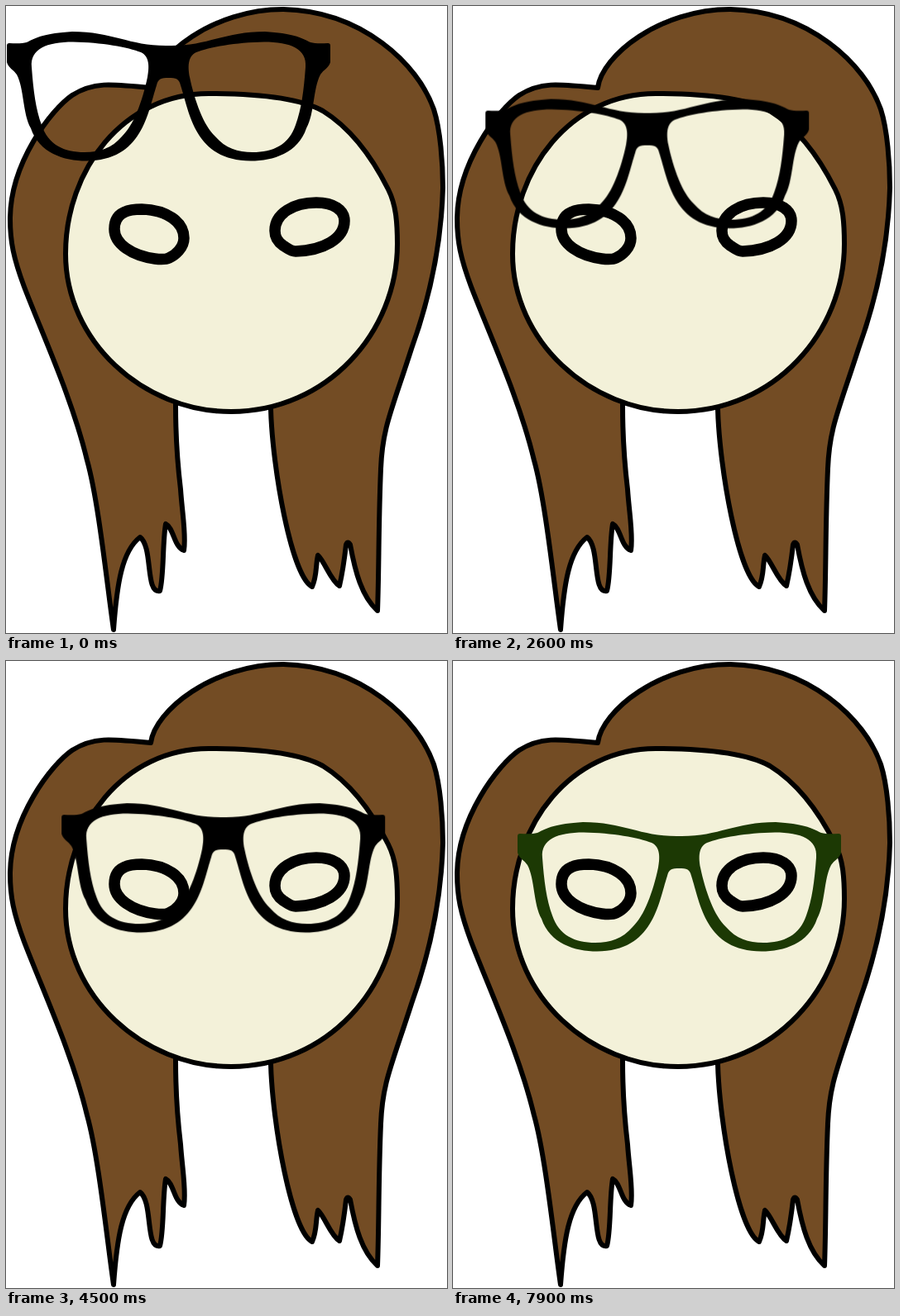
An HTML page without scripts for the animation above (8000 ms loop, 533 px wide and 759 px high).

```html
<!DOCTYPE html>
<html lang="en">
<head>
<meta charset="utf-8">
<title>Trying on glasses</title>
<style>
  html, body { margin: 0; width: 100%; height: 100%; overflow: hidden; background: #fff; }
  svg { display: block; width: 533px; height: 759px; }
  .outline { stroke: #000; stroke-width: 6; stroke-linejoin: round; }
  .hair { fill: #734c24; }
  .face { fill: #f3f1d9; }
  .eyes { fill: none; stroke: #000; stroke-width: 13.5; stroke-linejoin: round; }
  .glasses { fill-rule: evenodd; animation: wear 8s -5ms infinite; }

  /* Slide down in 100 ms ticks, rest, then settle while turning green. */
  @keyframes wear {
    0%     { transform: translate(-75px, -160px); fill: #000; animation-timing-function: steps(51); }
    63.75% { transform: none; fill: #000; animation-timing-function: steps(1); }
    68.75% { transform: translate(.29px, .57px); fill: #040801; animation-timing-function: steps(1); }
    71.25% { transform: translate(.43px, .86px); fill: #060c01; animation-timing-function: steps(11); }
    85%    { transform: translate(1.21px, 2.43px); fill: #112302; animation-timing-function: steps(1); }
    87.5%  { transform: translate(1.36px, 2.71px); fill: #132703; animation-timing-function: steps(9); }
    98.75%, 100% { transform: translate(2px, 4px); fill: #1c3904; }
  }
</style>
</head>
<body>
<svg viewBox="0 0 533 759">
  <path class="hair outline" d="M175 99
    C180 60 250 4 335 4 C430 6 498 70 517 125 C525 150 528 190 528 220
    C526 300 508 365 490 415 C466 490 455 510 453 560 C450 630 451 680 449 732
    C430 715 422 685 416 652 Q413 647 411 652 C409 670 407 685 403 702
    C392 695 385 672 377 665 C374 678 376 690 370 703 C345 690 322 560 320 488
    V440 H205 V484 C205 530 208 560 211 585 C213 615 218 640 215 659
    C203 655 203 632 193 627 C189 650 191 690 186 708 C168 712 178 655 162 643
    C140 660 134 700 130 755 C122 700 112 600 98 550 C80 475 45 400 22 340
    C9 305 5 285 5 258 C5 190 55 125 80 108 C105 92 125 94 175 99Z"/>
  <path class="face outline" d="M245 106 C290 106 350 109 383 127 C420 150 445 188 462 222
    C471 240 473 260 473 288 C473 395 388 491 272 491 C165 491 72 405 72 300
    C72 198 142 106 245 106Z"/>
  <g class="eyes">
    <path d="M131 270 C131 252 144 246 164 246 C194 247 215 261 215 281
      C215 293 204 302 197 305 C193 307 188 307 180 306 C152 302 131 288 131 270Z"/>
    <path d="M325 272 C325 251 348 238 375 238 C396 238 409 247 409 260
      C409 282 383 296 350 297 C344 297 340 293 335 290 C328 285 325 280 325 272Z"/>
  </g>
  <g class="glasses">
    <path id="half" d="M272 208 C225 209 205 191 155 191 C122 193 112 198 100 204 Q93 206 79 205 Q76 205 76 208
      V228 C78 235 84 237 88 243 C97 260 95 290 105 308 C115 338 145 347.5 172 347.5
      C240 347 246 290 257 256 C259 248 262 247 272 247Z
      M106 234 C104 212 124 203.5 156 203.5 C190 204 223 210 238 216 C249 221 248 235 246 246
      C240 275 229 305 215 318 C203 332 188 337 170 337 C145 337 126 328 118 304
      C111 285 108 262 106 234Z"/>
    <use href="#half" transform="matrix(-1 0 0 1 543 0)"/>
  </g>
</svg>
</body>
</html>
```
